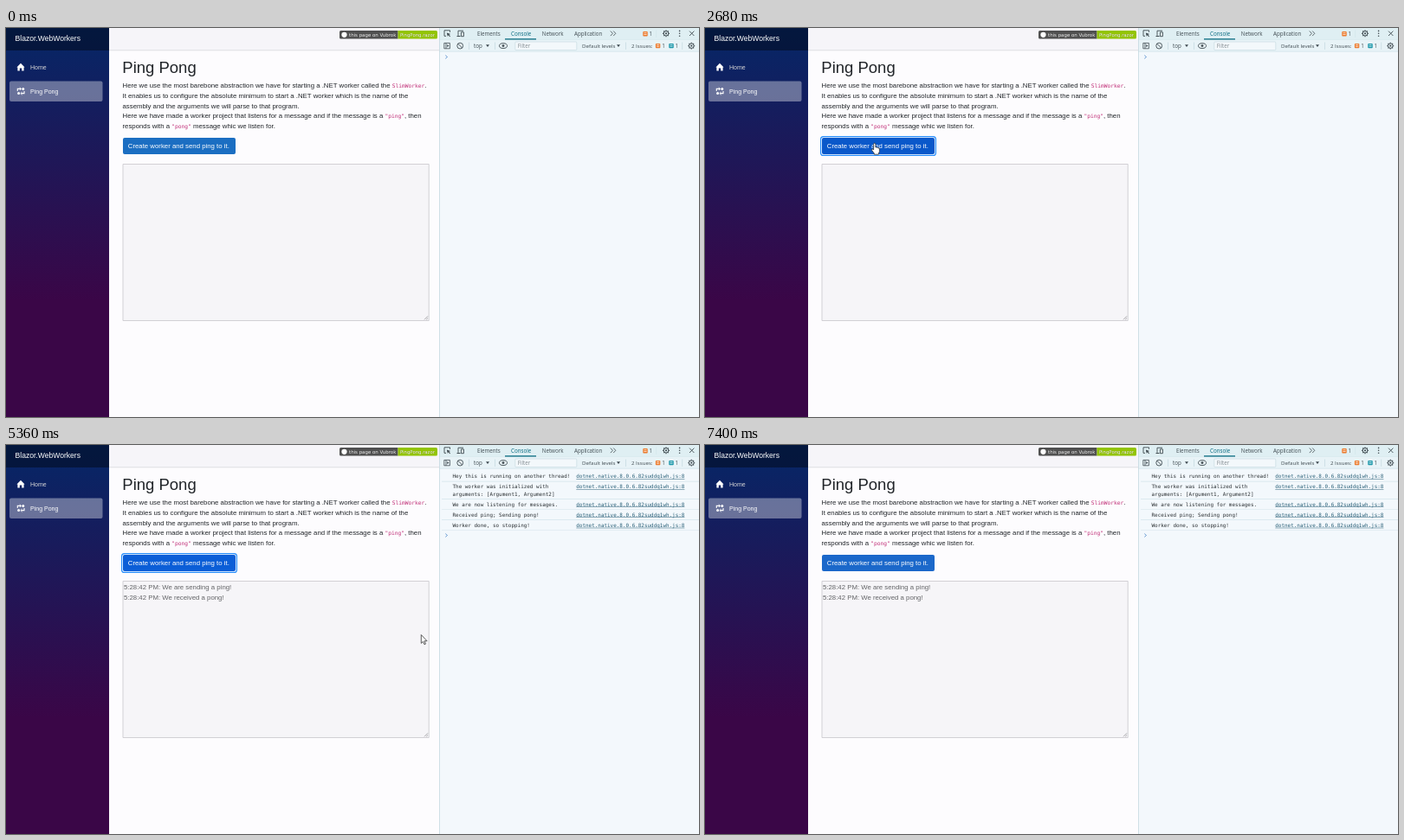
Recreate the animation shown at these times as an HTML page with a canvas. Size 800x450 px, loop 7440 ms.

```html
<!DOCTYPE html>
<html lang="en">
<head>
<meta charset="utf-8">
<title>Ping Pong</title>
<style>
html, body { margin: 0; width: 100%; height: 100%; overflow: hidden; background: #fdfcfe; }
canvas { display: block; width: 800px; height: 450px; }
</style>
</head>
<body>
<canvas id="stage"></canvas>
<script>
const LOOP = 7440, STEP = 40;
const SANS = '"Liberation Sans", Arial, sans-serif';
const UI = '"Open Sans", "Noto Sans", sans-serif';
const MONO = '"DejaVu Sans Mono", monospace';
const BADGE = '"DejaVu Sans", sans-serif';
const INK = '#212529', ICON = '#3f4a50', TEAL = '#00677d', LINE = '#cfe3ea';

const canvas = document.getElementById('stage');
const ctx = canvas.getContext('2d');
const ratio = window.devicePixelRatio || 1;
canvas.width = 800 * ratio;
canvas.height = 450 * ratio;

function rect(x, y, w, h, fill, r = 0) {
  ctx.fillStyle = fill;
  ctx.beginPath();
  ctx.roundRect(x, y, w, h, r);
  ctx.fill();
}

function frame(x, y, w, h, color, width = 1, r = 0) {
  ctx.strokeStyle = color;
  ctx.lineWidth = width;
  ctx.beginPath();
  ctx.roundRect(x, y, w, h, r);
  ctx.stroke();
}

// Draws text and returns the x where it ends.
function text(str, x, y, size, color = INK, family = SANS) {
  ctx.font = `${size}px ${family}`;
  ctx.fillStyle = color;
  ctx.fillText(str, x, y);
  return x + ctx.measureText(str).width;
}

function poly(points, color, width = 1, fill) {
  ctx.beginPath();
  points.forEach(([x, y], i) => i ? ctx.lineTo(x, y) : ctx.moveTo(x, y));
  if (fill) {
    ctx.closePath();
    ctx.fillStyle = fill;
    ctx.fill();
  }
  if (color) {
    ctx.strokeStyle = color;
    ctx.lineWidth = width;
    ctx.stroke();
  }
}

function ring(x, y, r, color, width = 1, from = 0, to = Math.PI * 2) {
  ctx.strokeStyle = color;
  ctx.lineWidth = width;
  ctx.beginPath();
  ctx.arc(x, y, r, from, to);
  ctx.stroke();
}

function dot(x, y, r, color) {
  ctx.fillStyle = color;
  ctx.beginPath();
  ctx.arc(x, y, r, 0, Math.PI * 2);
  ctx.fill();
}

const clamp = v => Math.max(0, Math.min(1, v));
const ramp = (t, from, to) => clamp((t - from) / (to - from));
const mix = (a, b, k) => a + (b - a) * k;
const smooth = k => k * k * (3 - 2 * k);
const mixColor = (a, b, k) => `rgb(${a.map((v, i) => Math.round(mix(v, b[i], k)))})`;

function drawSidebar() {
  const g = ctx.createLinearGradient(0, 0, 0, 450);
  g.addColorStop(0, 'rgb(5,39,103)');
  g.addColorStop(0.7, '#3a0647');
  rect(0, 0, 119, 450, g);
  rect(0, 0, 119, 26, 'rgba(0,0,0,0.4)');
  text('Blazor.WebWorkers', 10.5, 15.4, 8.58, '#fff');
  rect(4, 61.5, 107.5, 23.5, 'rgba(255,255,255,0.37)', 2);

  poly([[12.4, 45.4], [17, 40.8], [21.6, 45.4], [20.6, 45.4], [20.6, 49.6], [18.2, 49.6],
    [18.2, 46.6], [15.8, 46.6], [15.8, 49.6], [13.4, 49.6], [13.4, 45.4]], null, 0, '#fff');
  text('Home', 28, 48.4, 7.02, '#d7d7d7');

  dot(14.6, 75.4, 1.5, '#fff');
  dot(19.8, 70.6, 1.5, '#fff');
  poly([[13.3, 73], [13.3, 70.4], [17, 70.4]], '#fff', 1.1);
  poly([[15.8, 68.8], [17.6, 70.4], [15.8, 72]], '#fff', 0.9);
  poly([[21, 73], [21, 75.6], [17.6, 75.6]], '#fff', 1.1);
  poly([[18.6, 74], [16.9, 75.6], [18.6, 77.2]], '#fff', 0.9);
  text('Ping Pong', 28, 75.5, 7.02, '#fff');
}

function drawBadge() {
  ctx.save();
  ctx.beginPath();
  ctx.roundRect(385, 3, 113, 9.6, 1.6);
  ctx.clip();
  rect(385, 3, 67.5, 10, '#505050');
  rect(452.5, 3, 46, 10, '#93c404');
  ctx.restore();
  dot(390.5, 7.8, 3.1, '#fff');
  for (const [dy, color] of [[0.5, 'rgba(1,1,1,0.4)'], [0, '#fff']]) {
    text('this page on Vubrok', 396, 9.8 + dy, 5.45, color, BADGE);
    text('PingPong.razor', 455, 9.8 + dy, 5.35, color, BADGE);
  }
}

function drawPage() {
  rect(119, 0, 381, 450, '#fdfcfe');
  rect(119, 0, 381, 26, '#f6f5f9');
  rect(119, 25.6, 381, 0.7, '#d6d5d9');
  drawBadge();
  text('Ping Pong', 134.3, 52.2, 18.5);

  // Every second piece of a line is inline code.
  const lines = [
    ['Here we use the most barebone abstraction we have for starting a .NET worker called the ', 'SlimWorker', '.'],
    ['It enables us to configure the absolute minimum to start a .NET worker which is the name of the'],
    ['assembly and the arguments we will parse to that program.'],
    ['Here we have made a worker project that listens for a message and if the message is a ', '"ping"', ', then'],
    ['responds with a ', '"pong"', ' message whic we listen for.']
  ];
  lines.forEach((parts, row) => {
    let x = 134.5;
    parts.forEach((part, i) => {
      const y = 69.2 + row * 11.68;
      x = i % 2 ? text(part, x, y, 6.25, '#c02d76', MONO) : text(part, x, y, 7.8);
    });
  });
}

function drawButton(t) {
  const base = [27, 110, 194], hover = [11, 94, 215], press = [10, 88, 202];
  const blur = ramp(t, 7200, 7400);
  let color = mixColor(base, hover, ramp(t, 1920, 2120));
  if (t >= 2440) color = mixColor(press, hover, ramp(t, 2720, 2920));
  if (t >= 7200) color = mixColor(hover, [27, 104, 202], blur);
  const focus = ramp(t, 2440, 2600) * (1 - blur);
  if (focus > 0) {
    ctx.globalAlpha = focus;
    rect(133, 125, 134, 23, '#258cfb', 3.6);
    rect(134.2, 126.2, 131.6, 20.6, '#fff', 2.6);
    ctx.globalAlpha = 1;
  }
  rect(135, 127, 130, 19, color, 2);
  text('Create worker and send ping to it.', 140.8, 139.2, 7.8, '#fff');
}

function drawOutput(t) {
  rect(135, 157.5, 353.2, 181, '#f6f5f8');
  frame(135, 157.5, 353.2, 181, '#c8c7cc', 0.8);
  poly([[483, 337.3], [487, 333.3]], '#77777c', 0.6);
  poly([[485.2, 337.3], [487, 335.5]], '#77777c', 0.6);
  const grey = '#626366';
  if (t >= 3440) text('5:28:42 PM: We are sending a ping!', 136, 167.2, 7.8, grey);
  if (t >= 3480) text('5:28:42 PM: We received a pong!', 136, 179, 7.8, grey);
}

function gear(x, y) {
  ring(x, y, 2.8, ICON, 1);
  dot(x, y, 1.1, ICON);
  for (let i = 0; i < 8; i++) {
    const c = Math.cos(i * Math.PI / 4), s = Math.sin(i * Math.PI / 4);
    poly([[x + c * 2.9, y + s * 2.9], [x + c * 3.9, y + s * 3.9]], ICON, 1.2);
  }
}

function issue(x, y, color) {
  rect(x - 2.7, y - 2.7, 5.4, 5.4, color, 0.8);
  rect(x - 1.6, y - 1.4, 3.2, 0.7, '#fff');
  rect(x - 1.6, y + 0.3, 3.2, 0.7, '#fff');
  text('1', x + 4.6, y + 2.4, 6.2, ICON, UI);
}

const caret = (x, y) =>
  poly([[x - 2, y - 1.2], [x + 2, y - 1.2], [x, y + 1.6]], null, 0, ICON);

function drawTools() {
  rect(500, 0, 300, 450, '#f3f8fc');
  rect(500, 0, 300, 13.5, '#dfeff3');
  rect(500, 13.5, 300, 13.5, '#e8f3f7');
  rect(500, 13.2, 300, 0.6, LINE);
  rect(500, 26.8, 300, 0.6, LINE);
  rect(500, 0, 0.8, 450, '#c6d9e0');

  // Tab row
  poly([[508, 9.3], [506, 9.3], [506, 2.8], [512.5, 2.8], [512.5, 4.8]], ICON, 0.9);
  poly([[508.8, 5.4], [513.2, 7], [511.3, 7.7], [513, 9.6], [512.3, 10.2], [510.5, 8.3], [509.8, 10]], null, 0, ICON);
  poly([[522, 8.8], [522, 3.2], [528, 3.2]], ICON, 0.9);
  poly([[520.5, 9.5], [524.5, 9.5]], ICON, 1);
  frame(525.4, 4.9, 3, 4.8, ICON, 0.9);
  const tabs = [['Elements', 544], ['Console', 583], ['Network', 618.8], ['Application', 656]];
  for (const [name, x] of tabs) text(name, x, 8.9, 6.2, name === 'Console' ? TEAL : ICON, UI);
  rect(576, 12.3, 36, 1.2, TEAL);
  for (const x of [697.8, 701.2]) poly([[x, 3.5], [x + 2.6, 6.3], [x, 9.1]], ICON, 0.8);
  issue(738, 6.8, '#ec7a2c');
  rect(750.5, 2.5, 0.6, 8.5, LINE);
  gear(762, 6.3);
  for (const y of [3.4, 6.3, 9.2]) dot(777.6, y, 0.8, ICON);
  poly([[789, 3.6], [794.4, 9]], ICON, 0.9);
  poly([[794.4, 3.6], [789, 9]], ICON, 0.9);

  // Console row
  frame(505.8, 17.4, 6.6, 6.4, ICON, 0.8);
  rect(507.6, 17.4, 0.8, 6.4, ICON);
  poly([[509.3, 19], [511.4, 20.6], [509.3, 22.2]], null, 0, ICON);
  ring(524.2, 20.6, 3.4, ICON, 0.9);
  poly([[521.8, 18.2], [526.6, 23]], ICON, 0.9);
  for (const x of [534.3, 564, 715, 780.5]) rect(x, 16.5, 0.6, 8.5, '#bdd3db');
  text('top', 540, 23, 6.2, ICON, UI);
  caret(556, 20.5);
  ctx.beginPath();
  ctx.ellipse(574, 20.6, 4.5, 2.9, 0, 0, Math.PI * 2);
  ctx.strokeStyle = ICON;
  ctx.lineWidth = 0.9;
  ctx.stroke();
  dot(574, 20.6, 1.4, ICON);
  rect(587.8, 16, 71, 9.6, '#f3f8fb', 1);
  frame(587.8, 16, 71, 9.6, '#bfd5dd', 0.6, 1);
  text('Filter', 590.8, 23.2, 6.2, '#858d92', UI);
  text('Default levels', 665, 23, 6.15, ICON, UI);
  caret(707, 20.5);
  text('2 Issues:', 722, 23, 6.15, ICON, UI);
  issue(752.6, 20.6, '#ec7a2c');
  issue(768, 20.6, '#1795a8');
  gear(791.3, 20.6);
}

const logs = [
  [3400, 'Hey this is running on another thread!'],
  [3400, 'The worker was initialized with', 'arguments: [Argument1, Argument2]'],
  [3440, 'We are now listening for messages.'],
  [3560, 'Received ping; Sending pong!'],
  [3640, 'Worker done, so stopping!']
];

function drawConsole(t) {
  let top = 30;
  for (const [start, ...rows] of logs) {
    if (t < start) break;
    rows.forEach((row, i) => text(row, 515.5, top + 8.2 + i * 8.2, 5.94, '#2b3033', MONO));
    const end = text('dotnet.native.8.0.6.82suddq1wh.js:8', 658.3, top + 8.2, 5.94, '#285f77', MONO);
    rect(658.3, top + 9.1, end - 658.3, 0.5, '#285f77');
    top += 12.1 + (rows.length - 1) * 8.2;
    rect(503, top - 0.3, 297, 0.6, '#d3e4ec');
  }
  const y = top === 30 ? 33.5 : top + 5.8;
  poly([[507.3, y - 1.9], [509.5, y], [507.3, y + 1.9]], '#4a86c8', 0.8);
}

// Pointer path: time, x, y
const path = [
  [1240, 788, 286], [1920, 195.8, 133.4], [2680, 195.8, 133.4], [3040, 199.6, 135.4],
  [4160, 199.6, 135.4], [4480, 229.6, 155.4], [4880, 229.6, 155.4], [5640, 590, 248], [5960, 744, 284]
];

function pointerAt(t) {
  if (t < path[0][0] || t > path[path.length - 1][0]) return null;
  const i = Math.max(1, path.findIndex(p => p[0] >= t));
  const a = path[i - 1], b = path[i];
  const k = smooth(ramp(t, a[0], b[0]));
  return [mix(a[1], b[1], k), mix(a[2], b[2], k)];
}

function drawPointer(t) {
  const at = pointerAt(t);
  if (!at) return;
  const [x, y] = at;
  const onButton = x > 135 && x < 265 && y > 127 && y < 146;
  ctx.save();
  ctx.translate(x, y);
  ctx.lineJoin = 'round';
  const shape = onButton
    ? 'M-1.2 .9Q-1-.4 0-.2Q1 0 1 1V4.6Q2-.1+4 2.6 5Q4 4.4 4.2 5.5Q5.6 5.2 5.6 6.6V9Q5.6 10.4 4.6 11.4V12.8H-.5V11.6L-3.2 8Q-3.7 6.8-2.7 6.6Q-2 6.5-1.2 7.6Z'.replace('Q2-.1+4 2.6 5', 'Q2.4 3.8 2.6 5')
    : 'M0 0V9.8L2.2 7.8L3.7 11.2L5.2 10.5L3.7 7.2H6.8Z';
  const outline = new Path2D(shape);
  ctx.fillStyle = '#fff';
  ctx.fill(outline);
  ctx.strokeStyle = '#333';
  ctx.lineWidth = 0.8;
  ctx.stroke(outline);
  ctx.restore();
}

function draw(now) {
  const t = Math.floor((now % LOOP) / STEP) * STEP;
  ctx.setTransform(ratio, 0, 0, ratio, 0, 0);
  drawPage();
  drawSidebar();
  drawButton(t);
  drawOutput(t);
  drawTools();
  drawConsole(t);
  drawPointer(t);
}

const begin = performance.now();
function tick() {
  draw(performance.now() - begin);
  requestAnimationFrame(tick);
}
tick();
</script>
</body>
</html>
```
